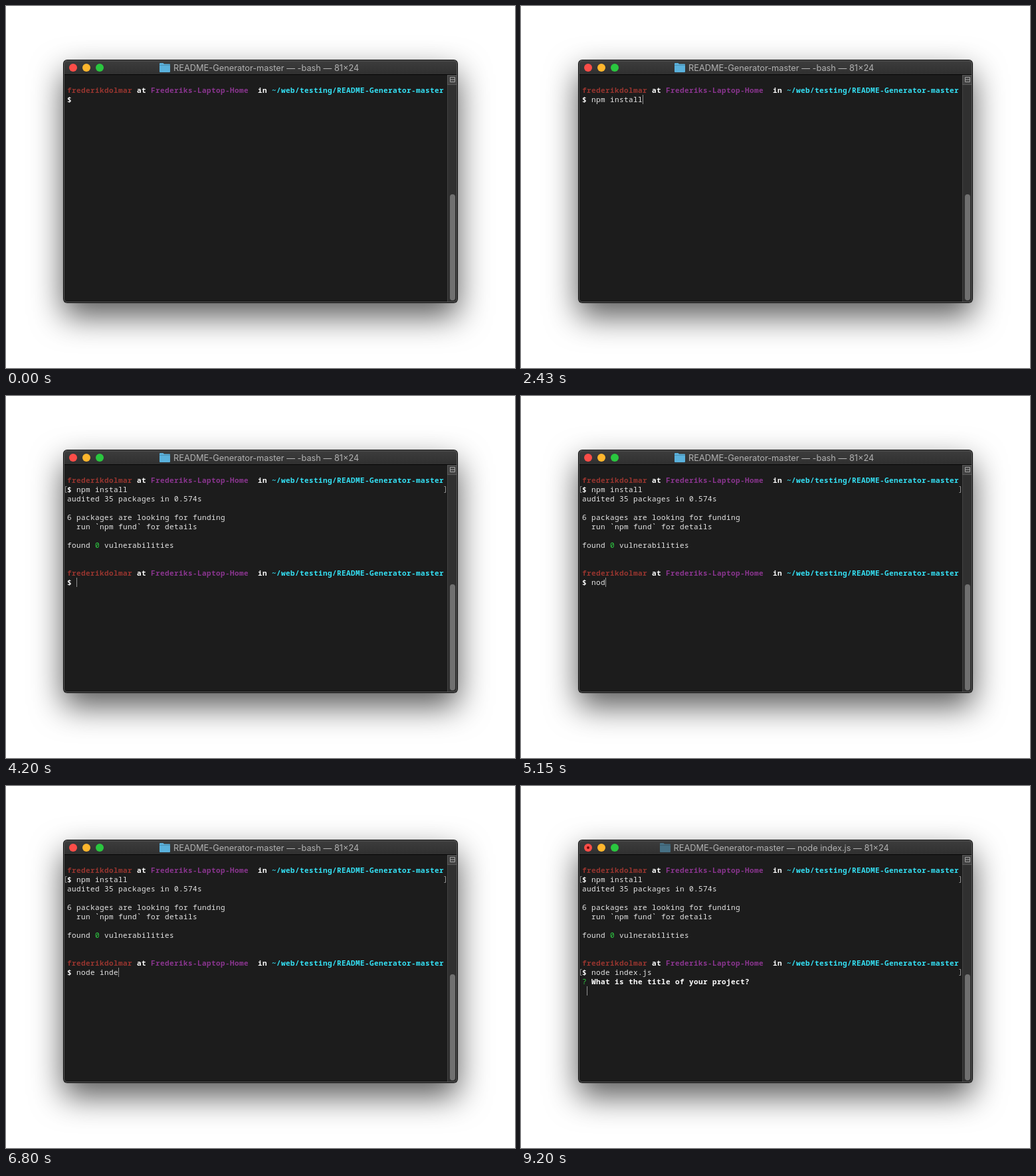
Write an HTML page that moves like this. It is 766 px wide and 546 px high and loops after 9.25 s.

```html
<!DOCTYPE html>
<html lang="en">
<head>
<meta charset="utf-8">
<title>Terminal session</title>
<style>
  html, body { margin: 0; width: 100%; height: 100%; overflow: hidden; background: #fff; }
  #stage { position: relative; width: 766px; height: 546px; overflow: hidden; }
  #shadow {
    position: absolute; left: 86px; top: 81px; width: 594px; height: 367px; border-radius: 6px;
    box-shadow: 0 20px 48px rgba(0, 0, 0, .65), 0 0 1px rgba(0, 0, 0, .5);
  }
  svg { position: absolute; left: 0; top: 0; }
  #title { font: 12.8px Inter, Roboto, sans-serif; fill: #b2b2b2; text-anchor: middle; white-space: pre; }
  #folder { fill: #5ab1dc; }
  .busy #folder { fill: #467084; }
  #dot, .bracket { visibility: hidden; }
  .busy #dot, .bracket.on { visibility: visible; }
  .bracket { fill: none; stroke: #929292; }
  pre {
    position: absolute; left: 92px; top: 120px; margin: 0; color: #e6e6e6;
    font: 11px/14px "Noto Sans Mono", "DejaVu Sans Mono", monospace; letter-spacing: .4px;
  }
  b { color: #fff; }
  .user { color: #97352f; }
  .host { color: #8a358f; }
  .path { color: #34e2f6; }
  .green { color: #2fd043; }
  #cursor { position: absolute; width: 1px; height: 14px; background: #929292; }
</style>
</head>
<body>
<div id="stage">
  <div id="shadow"></div>
  <svg width="766" height="546" viewBox="0 0 766 546">
    <defs>
      <linearGradient id="bar" x2="0" y2="1">
        <stop stop-color="#3d3d3d"/><stop offset="1" stop-color="#303030"/>
      </linearGradient>
      <clipPath id="frame"><rect x="87" y="82" width="592" height="365" rx="5"/></clipPath>
    </defs>
    <rect x="86" y="81" width="594" height="367" rx="6" fill="#050505"/>
    <g clip-path="url(#frame)">
      <rect x="87" y="82" width="592" height="365" fill="#1c1c1c"/>
      <rect x="87" y="82" width="592" height="21" fill="url(#bar)"/>
      <rect x="87" y="103" width="592" height="1" fill="#050505"/>
      <rect x="664" y="104" width="15" height="343" fill="#303030"/>
      <rect x="664" y="104" width="1" height="343" fill="#424242"/>
      <rect x="664.5" y="104.5" width="14" height="14" fill="#424242" stroke="#5a5a5a"/>
      <path d="M668.5 107.5h7v7h-7zM668.5 111h7" fill="none" stroke="#a5a5a5"/>
    </g>
    <rect x="668" y="284" width="8" height="160" rx="4" fill="#707070"/>
    <rect x="87.5" y="82.5" width="591" height="364" rx="4.5" fill="none" stroke="#5c5c5c"/>
    <circle cx="101" cy="93" r="6" fill="#fc4d48"/>
    <circle cx="121" cy="93" r="6" fill="#fdb62d"/>
    <circle cx="141" cy="93" r="6" fill="#2ac63f"/>
    <circle id="dot" cx="101" cy="93" r="2" fill="#780806"/>
    <g id="folder">
      <path d="M0 87q0-1 1-1h4.500l1.500 1.500h8q1 0 1 1V99q0 1-1 1H1q-1 0-1-1z"/>
      <path d="M0 89.500h16" stroke="#000" stroke-opacity=".18"/>
    </g>
    <text id="title" x="391.7" y="97.700"></text>
    <path class="bracket" d="M91.500 136.500h-2v9h2M659.500 136.500h2v9h-2"/>
    <path class="bracket" d="M91.500 276.500h-2v9h2M659.500 276.500h2v9h-2"/>
  </svg>
  <pre id="screen"></pre>
  <div id="cursor"></div>
</div>
<script>
  const LOOP = 9250, BLINK = 500;
  const INSTALL = 2450, AUDITED = 3950, RUN = 7560, ASKED = 7850;
  const installKeys = [250, 440, 630, 820, 1010, 1200, 1400, 1590, 1770, 1950, 2130];
  const runKeys = [4550, 4825, 5100, 5375, 5650, 5925, 6200, 6425, 6650, 6830, 7000, 7160, 7300];
  const events = [...installKeys, INSTALL, AUDITED, ...runKeys, RUN, ASKED];

  const bold = (name, text) => `<b class="${name}">${text}</b>`;
  const prompt = bold('user', 'frederikdolmar') + ' <b>at</b> ' +
    bold('host', 'Frederiks-Laptop-Home') + '  <b>in</b> ' +
    bold('path', '~/web/testing/README-Generator-master') + '\n<b>$</b> ';
  const audit = `
audited 35 packages in 0.574s

6 packages are looking for funding
  run \`npm fund\` for details

found <span class="green">0</span> vulnerabilities


`;
  const question = '\n<span class="green">?</span> <b>What is the title of your project?</b>';

  const byId = id => document.getElementById(id);
  const [stage, title, folder, screen, cursor] =
    ['stage', 'title', 'folder', 'screen', 'cursor'].map(byId);
  const brackets = document.querySelectorAll('.bracket');

  const typed = (text, keys, t) => text.slice(0, keys.filter(k => k <= t).length);

  function setTitle(task, folderX) {
    title.textContent = `README-Generator-master — ${task} — 81×24`;
    folder.setAttribute('transform', `translate(${folderX})`);
  }

  function showState(t) {
    const install = typed('npm install', installKeys, t);
    const run = typed('node index.js', runKeys, t);
    let text = prompt + install, col = 2 + install.length, row = 1;
    if (t >= INSTALL) [col, row] = [0, 2];
    if (t >= AUDITED) {
      text += audit + prompt + run;
      [col, row] = [2 + run.length, 11];
    }
    if (t >= RUN) [col, row] = [0, 12];
    if (t >= ASKED) {
      text += question;
      [col, row] = [1, 13];
    }
    screen.innerHTML = text;
    cursor.style.left = 92 + 7 * col + 'px';
    cursor.style.top = 120 + 14 * row + 'px';

    const installing = t >= INSTALL && t < AUDITED, running = t >= RUN;
    stage.classList.toggle('busy', installing || running);
    brackets[0].classList.toggle('on', t >= INSTALL);
    brackets[1].classList.toggle('on', running);
    if (installing) setTitle('node /usr/local/bin/npm install', 158);
    else if (running) setTitle('node index.js', 209);
    else setTitle('-bash', 231);
  }

  let shown = -1;
  function draw(now) {
    const t = now % LOOP;
    const count = events.filter(e => e <= t).length;
    if (count !== shown) showState(t);
    shown = count;
    const idle = t - events[count - 1];
    const visible = count > 0 && Math.floor(idle / BLINK) % 2 === 0;
    cursor.style.visibility = visible ? 'visible' : 'hidden';
  }

  const start = performance.now();
  function tick() {
    draw(performance.now() - start);
    requestAnimationFrame(tick);
  }
  tick();
</script>
</body>
</html>
```
